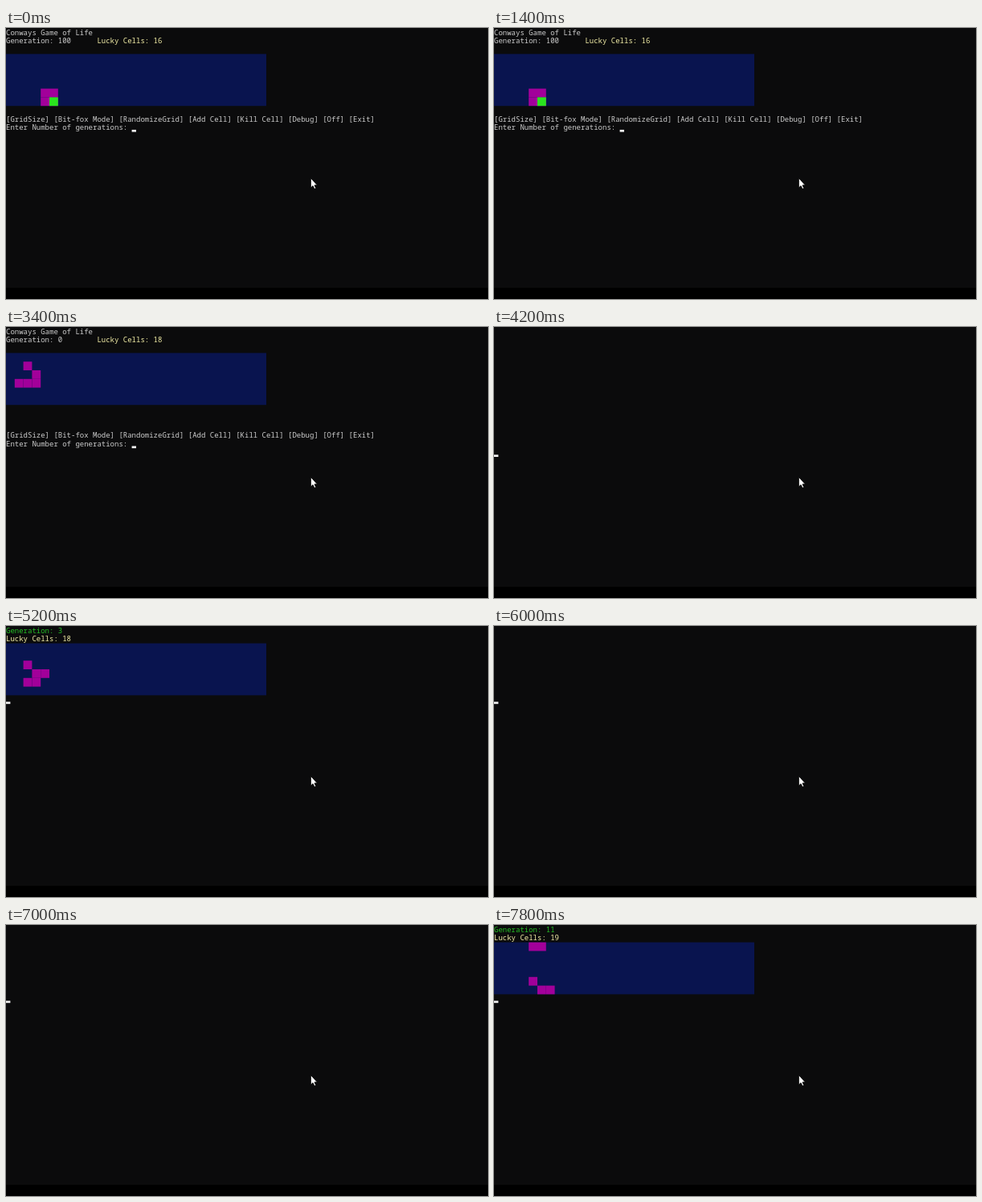
Animation of 600x338 px, one loop 8000 ms. Source, as an HTML page with a canvas:

```html
<!DOCTYPE html>
<html lang="en">
<head>
<meta charset="utf-8">
<title>Game of Life console</title>
<style>
html, body { margin: 0; width: 100%; height: 100%; overflow: hidden; background: #000; }
canvas { display: block; }
</style>
</head>
<body>
<canvas id="stage" width="600" height="338"></canvas>
<script>
const ctx = document.getElementById('stage').getContext('2d');
const LOOP = 8000, TICK = 200;
const CHAR = 5.4, LINE = 10.8;
const COLS = 30, ROWS = 6;
const GRAY = '#cccccc', YELLOW = '#f4efa8', GREEN = '#25bf25', WHITE = '#f2f2f2';
const MENU = '[GridSize] [Bit-fox Mode] [RandomizeGrid] [Add Cell] [Kill Cell] [Debug] [Off] [Exit]';
const PROMPT = 'Enter Number of generations: ';

const block = [[4, 4], [5, 4], [4, 5], [5, 5]];
const glider = [[2, 1], [3, 2], [1, 3], [2, 3], [3, 3]];

// One step of Life on a grid whose edges wrap around.
function evolve(cells) {
  const alive = new Set(cells.map(([x, y]) => y * COLS + x));
  const next = [];
  for (let y = 0; y < ROWS; y++) for (let x = 0; x < COLS; x++) {
    let n = 0;
    for (let dy = -1; dy <= 1; dy++) for (let dx = -1; dx <= 1; dx++) {
      const at = (y + dy + ROWS) % ROWS * COLS + (x + dx + COLS) % COLS;
      if ((dx || dy) && alive.has(at)) n++;
    }
    if (n === 3 || n === 2 && alive.has(y * COLS + x)) next.push([x, y]);
  }
  return next;
}
const history = [glider];
for (let g = 1; g < 14; g++) history.push(evolve(history[g - 1]));

function rect(x, y, w, h, color) {
  ctx.fillStyle = color;
  ctx.fillRect(x, y, w, h);
}

function print(text, col, row, color = GRAY) {
  ctx.fillStyle = color;
  ctx.fillText(text, col * CHAR, row * LINE + 8.6);
}

function caret(col, row) {
  rect(col * CHAR, row * LINE + 8.1, CHAR, 2.7, WHITE);
}

function drawGrid(cells, row) {
  const top = row * LINE;
  rect(0, top, COLS * LINE, ROWS * LINE, '#09144f');
  for (const [x, y] of cells) rect(x * LINE, top + y * LINE, LINE, LINE, '#a2009a');
}

function drawMenu(generation, lucky, cells, menuRow, caretOn) {
  print('Conways Game of Life', 0, 0);
  print('Generation: ' + generation, 0, 1);
  print('Lucky Cells: ' + lucky, 21, 1, YELLOW);
  drawGrid(cells, 3);
  print(MENU, 0, menuRow);
  print(PROMPT, 0, menuRow + 1);
  if (caretOn) caret(PROMPT.length, menuRow + 1);
}

function finished(caretOn) {
  drawMenu(100, 16, block, 10, caretOn);
  rect(5 * LINE, 8 * LINE, LINE, LINE, '#2ae41e');
}

function ready(caretOn) {
  drawMenu(0, 18, glider, 12, caretOn);
}

function drawGeneration(g) {
  print('Generation: ' + g, 0, 0, GREEN);
  print('Lucky Cells: ' + (g < 8 ? 18 : 19), 0, 1, YELLOW);
  drawGrid(history[g], 2);
}

// Each generation stays for 64% of its period, then the screen is cleared.
function run(t) {
  const age = (t - 5200) / 325 + 3.2;
  const g = Math.floor(age);
  if (t < 4600) drawGeneration(0);
  else if (age - g < 0.64) drawGeneration(g);
  caret(0, 8);
}

const scenes = [
  [0, () => finished(true)],
  [200, () => finished(false)],
  [600, () => finished(true)],
  [1000, () => finished(false)],
  [1200, () => {}],
  [1400, () => finished(true)],
  [2000, () => finished(false)],
  [2200, () => caret(0, 12)],
  [2400, () => ready(true)],
  [3000, () => ready(false)],
  [3400, () => ready(true)],
  [3800, () => ready(false)],
  [4000, () => {}],
  [4200, () => caret(0, 14)],
  [4400, run]
];

const pointer = new Path2D('M379.4 187.2V199.2L382 196.8L384 200.8L385.8 200L384 196H387.4Z');

function frame() {
  const t = Math.floor(performance.now() % LOOP / TICK) * TICK;
  rect(0, 0, 600, 338, '#000');
  rect(0, 0, 600, 324, '#0b0b0c');
  ctx.font = '9px "Noto Sans Mono", "DejaVu Sans Mono", monospace';
  scenes.findLast(([start]) => start <= t)[1](t);
  ctx.lineWidth = 0.8;
  ctx.strokeStyle = '#000';
  ctx.fillStyle = '#fff';
  ctx.fill(pointer);
  ctx.stroke(pointer);
  requestAnimationFrame(frame);
}
frame();
</script>
</body>
</html>
```
